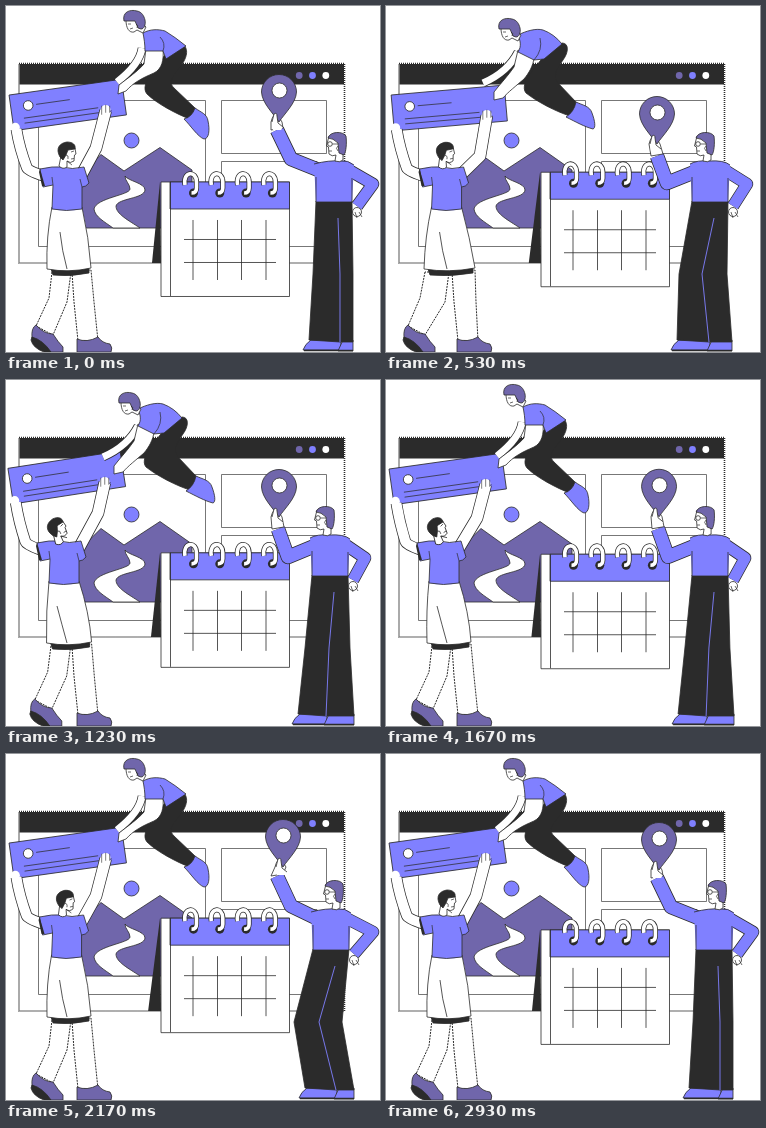
An HTML page with a canvas for the animation above (2970 ms loop, 374 by 346 pixels).

```html
<!DOCTYPE html>
<html lang="en">
<head>
<meta charset="utf-8">
<title>Planning together</title>
<style>
html, body { margin: 0; width: 100%; height: 100%; overflow: hidden; background: #fff; }
canvas { display: block; }
</style>
</head>
<body>
<canvas id="stage" width="374" height="346"></canvas>
<script>
const ctx = document.getElementById('stage').getContext('2d');
const LOOP = 2970, DARK = '#2b2b2b', BLUE = '#8080ff', VIOLET = '#7066ab', WHITE = '#fff';
const DOTS = [1, 1];

function shape(d, fill, line = DARK, width = 0.8, dash = []) {
  const path = new Path2D(d);
  if (fill) { ctx.fillStyle = fill; ctx.fill(path); }
  if (!line) return;
  ctx.strokeStyle = line;
  ctx.lineWidth = width;
  ctx.setLineDash(dash);
  ctx.stroke(path);
}

function disc(x, y, r, fill, line = null) {
  shape(`M${x - r},${y}a${r},${r} 0 1 0 ${2 * r},0a${r},${r} 0 1 0 ${-2 * r},0Z`, fill, line);
}

// An outlined tube along a path
function limb(d, width, fill) {
  shape(d, null, DARK, width + 1.5);
  shape(d, null, fill, width);
}

function group(x, y, degrees, draw) {
  ctx.save();
  ctx.translate(x, y);
  ctx.rotate(degrees * Math.PI / 180);
  draw();
  ctx.restore();
}

const lerp = (a, b, k) => a + (b - a) * k;
const ease = k => k * k * (3 - 2 * k);

function poseAt(t, keys) {
  const i = keys.findIndex(key => key[0] > t);
  const [from, to] = [keys[i - 1], keys[i]];
  const k = ease((t - from[0]) / (to[0] - from[0]));
  return from.slice(1).map((v, n) => lerp(v, to[n + 1], k));
}

function morph(a, b, k) {
  const ends = b.match(/-?[\d.]+/g);
  let i = 0;
  return a.replace(/-?[\d.]+/g, v => lerp(+v, +ends[i++], k));
}

// Each key: time, then pose values
const LEAN = [[0, 0], [500, 1], [1230, 1], [1650, 0], [LOOP, 0]];

// card x, card y, card angle, head turn, step, elbow x, elbow y
const CARRY = [
  [0, 61.5, 99, -8, 0, 0, 90, 142],
  [530, 63, 102, -5, 0.15, 1, 94, 150],
  [970, 60, 93, -9.8, 1, 1, 87, 134],
  [1230, 60.5, 97.5, -8.8, 1, 0.15, 92, 133],
  [1670, 61.5, 99, -8, 1, 0, 91, 138],
  [2170, 61.5, 99, -8, 0.15, 0, 90, 142],
  [LOOP, 61.5, 99, -8, 0, 0, 90, 142]
];

// pin x, y, wrist x, y, elbow x, y, head x, waist, left knee, left ankle,
// inner knee, inner ankle, right knee, right ankle, right elbow
const STAND = [273, 116, 271, 124, 285, 153, 331, 310, 307, 303, 334, 334, 347, 347, 367];
const WIDE = [273, 137, 272, 149, 282, 177, 319, 306, 299, 292, 323, 320, 344, 348, 359];
const POINT = [
  [0, ...STAND],
  [530, 271, 138, 271, 150, 281, 177, 319, 306, 293, 291, 316, 323, 341, 346, 361],
  [750, ...WIDE],
  [1640, ...WIDE],
  [2170, 277, 113, 271, 122, 285, 152, 328, 307, 288, 299, 313, 330, 336, 348, 367],
  [2670, ...STAND],
  [LOOP, ...STAND]
];

function drawWindow() {
  shape('M13,57.5H338.5V257H13Z', WHITE, DARK, 1.6, DOTS);
  shape('M13.5,58H338V78.5H13.5Z', DARK, null);
  [VIOLET, BLUE, WHITE].forEach((c, i) => disc(293.2 + i * 13.3, 69.5, 3.4, c));
  shape('M32.5,94.5H199.5V240.5H32.5ZM215.5,94.5H320.5V147.5H215.5ZM215.5,155.5H311V240.5H215.5Z',
    null, '#555', 0.8);
  disc(125.5, 134.5, 7.5, BLUE, DARK);
  shape('M62,181L95,148.5L118,165L154,141.5L186,164V222H62Z', VIOLET);
  shape('M119,170C122,175 139,177 139,184C138,193 112,192 110,200C110,208 122,214 134,222' +
    'H107C99,216 89,211 88,203C90,192 124,189 124,183C124,178 119,175 119,170Z', WHITE);
}

function drawCard(x, y, angle) {
  group(x, y, angle, () => {
    shape('M-56.5,-18H57V18H-56.5Z', BLUE);
    disc(-39, -5, 4.8, WHITE, DARK);
    shape('M-31,-5H3M-45,7H30M-45,12H43', null, DARK, 0.7);
  });
}

function drawCarrier([cx, cy, angle, turn, step, ex, ey]) {
  const a = angle * Math.PI / 180;
  const grip = (x, y) => [cx + x * Math.cos(a) - y * Math.sin(a), cy + x * Math.sin(a) + y * Math.cos(a)];
  const [lx, ly] = grip(-54, 17), [rx, ry] = grip(37, 11);
  const back = -3 * turn;

  // legs and shoes
  shape(`M${46 - 7 * step},266L${43 - 9 * step},292L${30 - 8 * step},320L${47 - 8 * step},329` +
    `L${61 - 2 * step},296L${65 - 2 * step},266Z`, WHITE, DARK, 1, [2, 1]);
  shape(`M66,266L68,296L72,335H92L${88 + 2 * step},296L${85 + 4 * step},264Z`, WHITE, DARK, 1, [2, 1]);
  group(-8 * step, 0, 0, () => {
    shape('M30,319Q38,328 47,328Q52,336 57,341V346H44Q34,336 26,332Q25,322 30,319Z', VIOLET);
    shape('M26,331Q37,334 45,346H38Q27,342 25,334Z', DARK);
  });
  shape('M71,333Q81,337 92,331Q96,337 104,338Q107,342 105,346H71Z', VIOLET);

  // shorts
  const left = 41 - 3 * step, right = 85 + 4 * step;
  shape(`M${left + 4},263L${left + 6},269Q65,271 ${right - 2},267V262Z`, DARK);
  shape(`M${46 + back},201Q${40 - step},230 ${left},263Q63,267 ${right},262Q${83 + step},232 ${76 + back},201Z`, WHITE);
  shape(`M${54 + back},226Q56,245 61,263`, null);

  // arms, shirt, head
  limb(`M${lx},${ly}Q${lx + 3},142 ${21 + back / 2},162Q${22 + back / 2},165 ${38 + back},170`, 10, WHITE);
  limb(`M${rx},${ry}L${ex},${ey}L${76 + back},168`, 11, WHITE);
  disc(lx - 1, ly - 2, 4.5, WHITE);
  disc(rx, ry - 1, 4.8, WHITE);
  shape(`M${rx - 4},${ry - 5}v9M${rx},${ry - 6}v8M${rx + 4},${ry - 5}v7`, null, DARK, 0.6);
  group(back, 0, 0, () => {
    shape('M34,163Q47,160 56,161Q66,164 78,161L83,177Q80,181 76,181L76,203Q60,206 46,203L47,179L37,181Z', BLUE);
    shape('M34,163L33,166L36,180L39,180Z', DARK, null);
    shape('M47,179L46,171M76,181L74,173', null, DARK, 0.7);
  });
  group(61 - 10 * turn, 146 + 2 * turn, -25 * turn, () => {
    shape('M8,-4L9,2L7.5,3L7,9Q3,12 0,9L0,15Q-4,18 -8,14L-6,4L-1,-4Z', WHITE);
    shape('M-7,5C-12,-4 -7,-9 0,-10C6,-10 9,-7 8,-3L1,-2L-1,3L-4,8Z', DARK);
    shape('M4,0L7,-1M4,7L7,6.5M0,9L5,13M-1,3q3,0 2,4', null, DARK, 0.7);
  });
}

function drawClimber(k) {
  const blend = (a, b) => morph(a, b, k);
  limb(blend('M136,42Q134,58 111,76', 'M132,46Q122,66 97,77'), 7, WHITE);
  shape(blend(
    'M178,39C184,46 179,56 170,66C165,73 163,77 168,82L189,102L186,114C170,108 150,97 141,88C137,83 139,76 146,67L158,50Z',
    'M176,37C183,37 183,46 177,54C170,64 167,70 172,77L190,96L187,111C170,106 150,95 140,87C136,82 139,74 147,64L158,50Z'
  ), DARK);
  shape(blend(
    'M189,102C196,107 201,108 202,115C204,124 203,133 198,133C192,131 185,120 178,113Q186,111 189,102Z',
    'M190,96C196,99 204,100 206,107C209,115 210,122 207,123C199,121 190,116 180,111Q188,106 190,96Z'
  ), BLUE);
  shape(blend(
    'M140,43L157,43C158,54 156,63 148,67C136,72 127,77 120,85L112,88L113,79C122,72 132,65 138,58Z',
    'M132,44L148,52C147,60 143,67 138,73C130,80 122,86 117,92L108,94L108,86C114,78 122,70 128,61Z'
  ), WHITE);
  shape(blend(
    'M137,27C144,23 152,23 159,25Q169,31 180,40L160,53L157,45L139,45C139,38 138,32 137,27Z',
    'M132,29C140,25 150,22 157,24Q168,28 176,38L158,53L148,54L132,46C136,40 134,34 132,29Z'
  ), BLUE);
  shape(blend('M157,45Q160,37 154,31', 'M148,54Q157,44 154,32'), null, DARK, 0.7);
  group(lerp(128, 123, k), lerp(14, 22, k), 0, () => {
    shape('M-8,0C-8,8 -5,13 0,12L3,10L9,13L12,7L2,-3Z', WHITE);
    shape('M-10,1C-12,-8 -4,-11 3,-9C8,-8 10,-4 11,0C12,5 10,9 7,9L4,8L1,1L-5,1Z', VIOLET);
    shape('M-6,4L-3,4M-4,9L-1,8M2,4q3,1 1,4', null, DARK, 0.7);
  });
}

function drawCalendar(top) {
  shape(`M154,${top}L${146 - (176 - top) * 0.33},257H155Z`, DARK, null);
  group(0, top, 0, () => {
    shape('M155,0H283.5V114.5H155Z', WHITE);
    shape('M164,0H283.5V27H164Z', BLUE);
    shape('M164.5,0V114', null, DARK, 0.8);
    shape('M178,57.5H270M178,80.5H270M187,38V98M211.5,38V98M235.5,38V98M260,38V98', null, DARK, 0.8);
    for (let i = 0; i < 4; i++) {
      group(184.5 + 26.3 * i, 0, 0, () => {
        disc(3, 11, 4.5, DARK);
        limb('M-5.5,3C-8,-11 6,-12 6,0V6Q6,11 1,11', 3.6, WHITE);
      });
    }
  });
}

function drawPointer([px, py, wx, wy, ax, ay, hx, waist, kneeL, ankleL, kneeIn, ankleIn, kneeR, ankleR, elbow]) {
  const hip = waist + 36, fork = waist + 22;

  shape(`M${ankleL + 2},334Q${ankleL - 4},338 ${ankleL - 6},344H${ankleIn + 1}V334Z`, BLUE);
  shape(`M${ankleIn + 3},334L${ankleIn - 2},345H${ankleR}V334Z`, BLUE);
  shape(`M${ankleL - 5},344.5H${ankleR}`, null, DARK, 1.4);
  shape(`M${waist},195L${kneeL},268L${ankleL},334L${ankleIn},336` +
    `L${ankleR},336L${kneeR},268L${hip},195Z`, DARK);
  shape(`M${fork},212L${kneeIn},268L${ankleIn},336`, null, BLUE, 0.9);

  disc(waist + 41, 206, 4.5, WHITE, DARK);
  shape(`M${waist + 39},206l2,6M${waist + 43},206l3,5`, null, DARK, 0.7);
  limb(`M${waist + 31},163L${elbow},178L${waist + 41},200`, 11, BLUE);
  limb(`M${wx},${wy}L${ax},${ay}L${waist + 5},165`, 13, BLUE);
  shape(`M${waist - 2},158Q${hx - 8},154 ${hx + 4},155Q${hip - 4},154 ${hip + 2},159L${hip},196H${waist}Z`, BLUE, null);
  shape(`M${waist - 2},158Q${hx - 8},154 ${hx + 4},155Q${hip - 4},154 ${hip + 2},159` +
    `M${hip},172V196H${waist}V171`, null);

  group(hx, 138, 0, () => {
    shape('M-8,-8L-10.5,2L-8.5,3L-8,10Q-5,13 -1,11L-2,17Q3,19 6,16V0Z', WHITE);
    shape('M-9,-6C-7,-13 6,-13 9,-8C10,0 9,8 7,11L2,9L1,-1Q-4,-6 -9,-6Z', VIOLET);
    disc(-7, 0, 2.3, null, DARK);
    shape('M-4.5,0H1M-8,7L-5,7M1,2q-3,2 0,5', null, DARK, 0.7);
  });

  shape(`M${wx - 6},${wy}L${px - 8},${py}Q${px - 6},${py - 8} ${px - 2},${py - 8}` +
    `L${px + 3},${py}L${wx + 6},${wy - 2}Z`, WHITE);
  group(px, py, 0, () => {
    shape('M0,0C-6,-9 -17,-19 -17.5,-30A17.5,17.5 0 0 1 17.5,-30C17,-19 6,-9 0,0Z', VIOLET);
    disc(0.5, -31.5, 7.5, WHITE, DARK);
    shape('M-7,0L-5,-8Q-2,-10 -2,-6L-1,1L4,5L2,8H-6Z', WHITE, null);
    shape('M-7,0L-5,-8Q-2,-10 -2,-6L-1,1L4,5', null, DARK, 0.8);
  });
}

function frame(now) {
  const t = now % LOOP;
  const carry = poseAt(t, CARRY);
  ctx.lineJoin = 'round';
  ctx.fillStyle = WHITE;
  ctx.fillRect(0, 0, 374, 346);
  drawWindow();
  drawCard(...carry);
  drawCarrier(carry);
  drawClimber(poseAt(t, LEAN)[0]);
  drawCalendar(170 + 6 * Math.cos(4 * Math.PI * t / LOOP));
  drawPointer(poseAt(t, POINT));
  requestAnimationFrame(frame);
}
requestAnimationFrame(frame);
</script>
</body>
</html>
```
